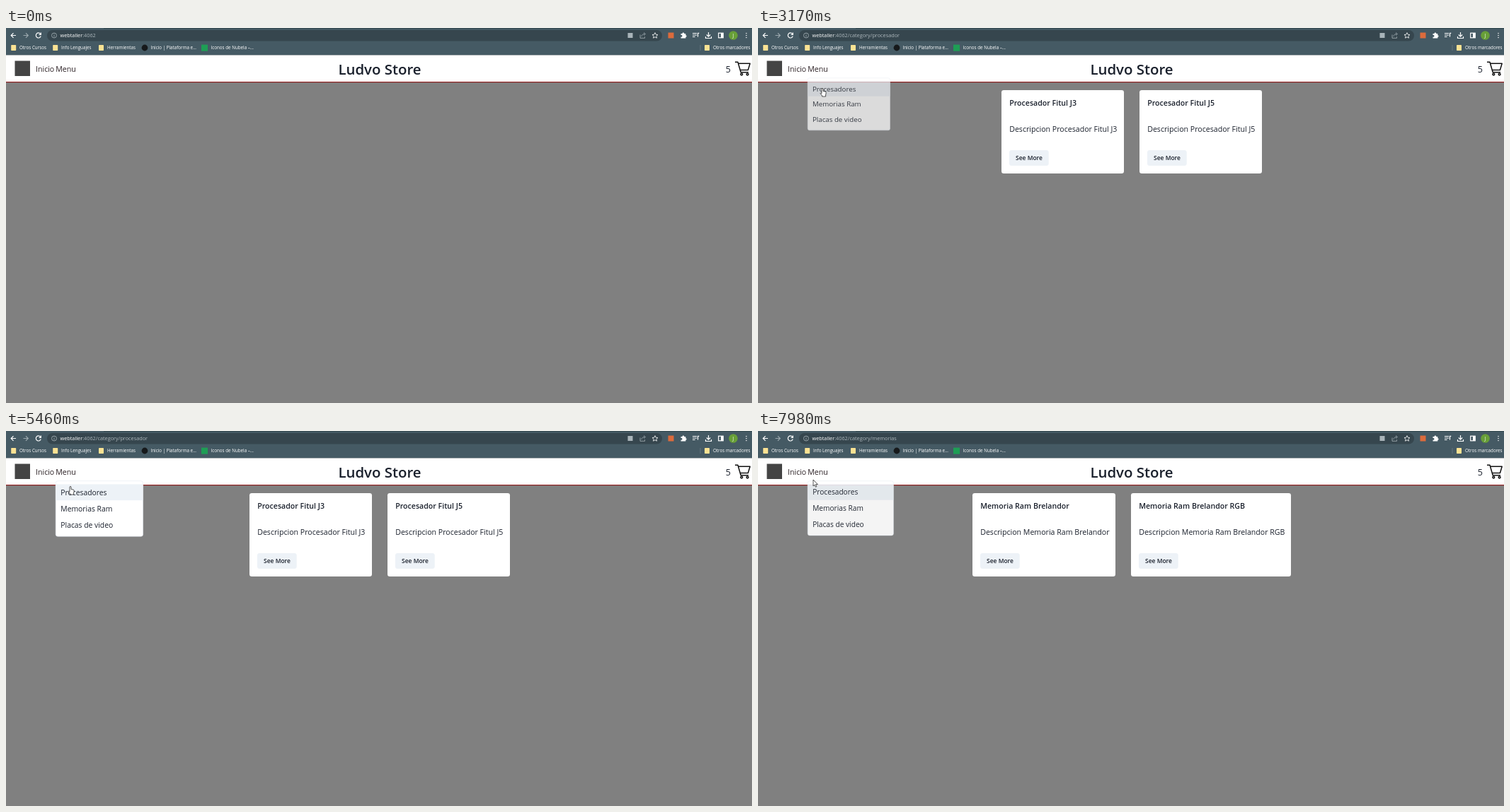
Recreate the animation shown at these times as an HTML page. Size 1054 by 531 pixels, loop 8 s.

```html
<!DOCTYPE html>
<html lang="es">
<head>
<meta charset="utf-8">
<title>Ludvo Store</title>
<style>
  html, body { margin: 0; width: 100%; height: 100%; overflow: hidden; background: #808080; }
  svg { display: block; width: 100%; height: 100%; }
  text { font: 10.6px "Open Sans", "Noto Sans", sans-serif; fill: #1a202c; white-space: pre; }
  .bar text { font-size: 6.25px; fill: #fff; }
  .bar .url { font-size: 7.3px; }
  .bar .path { fill: #aeb8bd; }
  .icon { fill: none; stroke: #fff; stroke-width: 1.2; }
  .dim { stroke: #a9b4b9; stroke-width: .8; }
  .nav { fill: #2b2024; }
  .brand { font-size: 20.4px; font-weight: 600; text-anchor: middle; }
  .count { font-size: 12.6px; }
  .title { font-weight: 600; }
  .button { font-size: 8.45px; font-weight: 600; text-anchor: middle; }
  .menu text { font-size: 10.35px; }
</style>
</head>
<body>
<svg viewBox="0 0 1054 531">
  <rect width="1054" height="531" fill="#808080"/>

  <g class="bar">
    <rect width="1054" height="38.5" fill="#455a64"/>
    <rect x="138" width="916" height="1" fill="#31474d"/>
    <rect x="58" y="3" width="869" height="15.4" rx="7.7" fill="#36464e"/>
    <g class="icon">
      <path d="M14 10.5H7.5M10.5 7.2 7.2 10.5l3.3 3.3"/>
      <path d="M24.5 10.5H31M28 7.2l3.3 3.3-3.3 3.3" stroke="#9aa7ad"/>
      <path d="M48.6 8.3A3.5 3.5 0 1 0 49.2 11.5M49.3 6.6v2.7h-2.7"/>
      <path d="M970 7.5h6M970 10h6M970 12.5h3.5M977.5 7v5.5M977 7.3h2.3"/>
      <path d="M992.5 6v6M989.8 9.5l2.7 2.7 2.7-2.7M988.5 12v2.5h8V12"/>
      <rect x="1006.7" y="7.2" width="6.6" height="6.6"/>
      <path d="M1011.5 7v7" stroke-width="3"/>
    </g>
    <g class="icon dim">
      <circle cx="68" cy="10.5" r="3.5"/>
      <path d="M68 10v2.5M68 8.4v.9"/>
      <path d="M896 9.5v4.8h6.5v-2M898 11.8c.3-2.2 2-3.3 4-3.3M901 6.5l2.5 2-2.5 2"/>
      <path d="M917 6.6l1.2 2.6 2.8.3-2.1 1.9.6 2.8-2.5-1.4-2.5 1.4.6-2.8-2.1-1.9 2.8-.3z" stroke="#fff"/>
    </g>
    <rect x="878.5" y="7" width="7" height="7" fill="#a9b4b9"/>
    <rect x="935.5" y="6.5" width="8" height="8" fill="#dc6b3c"/>
    <path d="M953.5 8h2a1.4 1.4 0 1 1 2.8 0h2v2.2a1.3 1.3 0 1 1 0 2.6v1.7h-6.8v-2a1.4 1.4 0 1 0 0-2.6z" fill="#fff"/>
    <circle cx="1027.5" cy="10.5" r="6.3" fill="#689f38"/>
    <text x="1026.5" y="12.8">J</text>
    <path d="M1046 7.5v.1M1046 10.5v.1M1046 13.5v.1" stroke="#fff" stroke-width="1.5" stroke-linecap="round"/>
    <text class="url" x="76.5" y="13.2">webtaller<tspan class="path" id="path"></tspan></text>

    <g fill="#fbe293">
      <rect x="7.2" y="24" width="7" height="8" rx=".7"/>
      <rect x="66.2" y="24" width="7" height="8" rx=".7"/>
      <rect x="131" y="24" width="7" height="8" rx=".7"/>
      <rect x="987" y="24" width="7" height="8" rx=".7"/>
    </g>
    <circle cx="196" cy="28" r="4.4" fill="#16191b"/>
    <rect x="276" y="23.6" width="9" height="9" fill="#1e9e55"/>
    <path d="M981 24v8" stroke="#71828a" stroke-width=".7"/>
    <text x="19" y="30.3">Otros Cursos</text>
    <text x="78" y="30.3">Info Lenguajes</text>
    <text x="143" y="30.3">Herramientas</text>
    <text x="204.5" y="30.3">Inicio | Plataforma e...</text>
    <text x="289.5" y="30.3">Iconos de Nubela –...</text>
    <text x="999" y="30.3">Otros marcadores</text>
  </g>

  <rect y="38.5" width="1054" height="37.7" fill="#fff"/>
  <rect y="76" width="1054" height="1.2" fill="#8f2020"/>
  <rect x="12.5" y="46.5" width="21.5" height="21.5" fill="#444"/>
  <text class="nav" x="42" y="61.8">Inicio</text>
  <text class="nav" x="70.2" y="61.8">Menu</text>
  <text class="brand" x="528" y="66">Ludvo Store</text>
  <text class="count" x="1016.8" y="62.8">5</text>
  <g fill="none" stroke="#111" stroke-width="1.5" stroke-linejoin="round">
    <path d="M1030 48.3h4l4.2 14.5h10.8M1034.8 50.3h16.4l-2.8 9.2h-11"/>
    <circle cx="1039.3" cy="65.6" r="1.4"/>
    <circle cx="1047.6" cy="65.6" r="1.4"/>
  </g>

  <g id="cards"></g>

  <g class="menu" id="menu">
    <rect x="70.2" y="70.7" width="123.4" height="78.6" rx="3" fill="#fff" stroke="#e2e8f0" stroke-width=".55"/>
    <rect id="highlight" x="70.5" width="122.8" height="22.8" fill="#edf2f7"/>
    <text x="77.3" y="90.8">Procesadores</text>
    <text x="77.3" y="113.8">Memorias Ram</text>
    <text x="77.3" y="136.8">Placas de video</text>
  </g>

  <g id="cursor" fill="#fff" stroke="#111" stroke-width=".7" stroke-linejoin="round">
    <path id="arrow" d="M0 0v9l2-1.8 1.4 3.1 1.5-.7L3.5 6.6h2.9z"/>
    <path id="hand" d="M-1 1q1-1.6 2 0v3.4l3 .6q1.3.3 1.2 1.6L4.6 10v2H-.4v-1.2L-3 7.6q.2-1.3 2 0z"/>
  </g>
</svg>

<script>
const LOOP = 8000;
const $ = id => document.getElementById(id);

const pages = [
  { from: 0, path: "", cards: [] },
  { from: 3070, path: "/category/procesador", cards: [
    [344, 173, "Procesador Fitul J3"], [539, 173, "Procesador Fitul J5"]] },
  { from: 6480, path: "/category/memorias", cards: [
    [303, 202, "Memoria Ram Brelandor"], [527, 226, "Memoria Ram Brelandor RGB"]] }
];

// Pointer tip: time, x, y
const pointer = [
  [680, 1005, 526], [900, 620, 330], [1150, 340, 180], [1330, 250, 141],
  [1480, 145, 102], [1570, 174, 130], [1750, 140, 100], [2100, 73, 52],
  [2310, 84, 58], [2480, 85, 60], [2880, 91, 85], [3260, 91, 85],
  [3500, 200, 120], [3840, 380, 160], [4150, 360, 170], [4580, 288, 137],
  [4670, 181, 101], [4970, 87, 64], [5120, 87, 64], [5220, 88, 59],
  [5460, 91, 78], [5880, 102, 108], [6950, 102, 108], [7300, 86, 72],
  [7720, 76, 58], [7850, 76, 58], [7980, 78, 69]
];

// The second closing stops just short of fully transparent.
const menuRuns = [
  { open: 2370, close: 3130, rest: 0, end: 5150 },
  { open: 5150, close: 6530, rest: .035, end: 7850 },
  { open: 7850, close: LOOP, rest: 0, end: LOOP }
];

const clamp = v => Math.min(1, Math.max(0, v));

function pointerAt(t) {
  const next = pointer.findIndex(p => p[0] > t);
  if (next < 0) return pointer[pointer.length - 1].slice(1);
  const [t0, x0, y0] = pointer[next - 1] || pointer[0];
  const [t1, x1, y1] = pointer[next];
  const k = t1 > t0 ? clamp((t - t0) / (t1 - t0)) : 0;
  return [x0 + (x1 - x0) * k, y0 + (y1 - y0) * k];
}

function menuOpenness(t) {
  const run = menuRuns.find(r => t >= r.open && t < r.end);
  if (!run) return 0;
  if (t >= run.close) return Math.max(run.rest, 1 - (t - run.close) / 145);
  const k = clamp((t - run.open) / 160);
  return k * k * (3 - 2 * k);
}

const card = ([x, width, name]) => `
  <rect x="${x}" y="88" width="${width}" height="118" rx="3.3" fill="#fff"/>
  <text class="title" x="${x + 11.2}" y="110.2">${name}</text>
  <text x="${x + 11.2}" y="147">Descripcion ${name}</text>
  <rect x="${x + 11}" y="173" width="55.7" height="22" rx="3.3" fill="#edf2f7"/>
  <text class="button" x="${x + 39}" y="187.3">See More</text>`;

let shownPage;
function showPage(page) {
  if (page === shownPage) return;
  shownPage = page;
  $("path").textContent = ":4062" + page.path;
  $("cards").innerHTML = page.cards.map(card).join("");
}

function render(t) {
  showPage(pages.filter(p => t >= p.from).pop());

  const [x, y] = pointerAt(t);
  const open = menuOpenness(t);
  const scale = .8 + .2 * open;
  const row = Math.min(2, Math.max(0, Math.floor((y - 75.4) / 22.9)));
  $("menu").setAttribute("opacity", open);
  $("menu").setAttribute("transform", `translate(70 70.5) scale(${scale}) translate(-70 -70.5)`);
  $("highlight").setAttribute("y", 75.4 + row * 22.9);

  const overButton = x > 70 && x < 99 && y > 51 && y < 66;
  const overItem = open > .5 && x > 70 && x < 194 && y > 75;
  const isHand = overButton || overItem;
  $("cursor").setAttribute("transform", `translate(${x} ${y})`);
  $("cursor").setAttribute("visibility", t < 680 ? "hidden" : "visible");
  $("hand").setAttribute("display", isHand ? "inline" : "none");
  $("arrow").setAttribute("display", isHand ? "none" : "inline");
}

const start = performance.now();
function tick() {
  render((performance.now() - start) % LOOP);
  requestAnimationFrame(tick);
}
tick();
</script>
</body>
</html>
```
